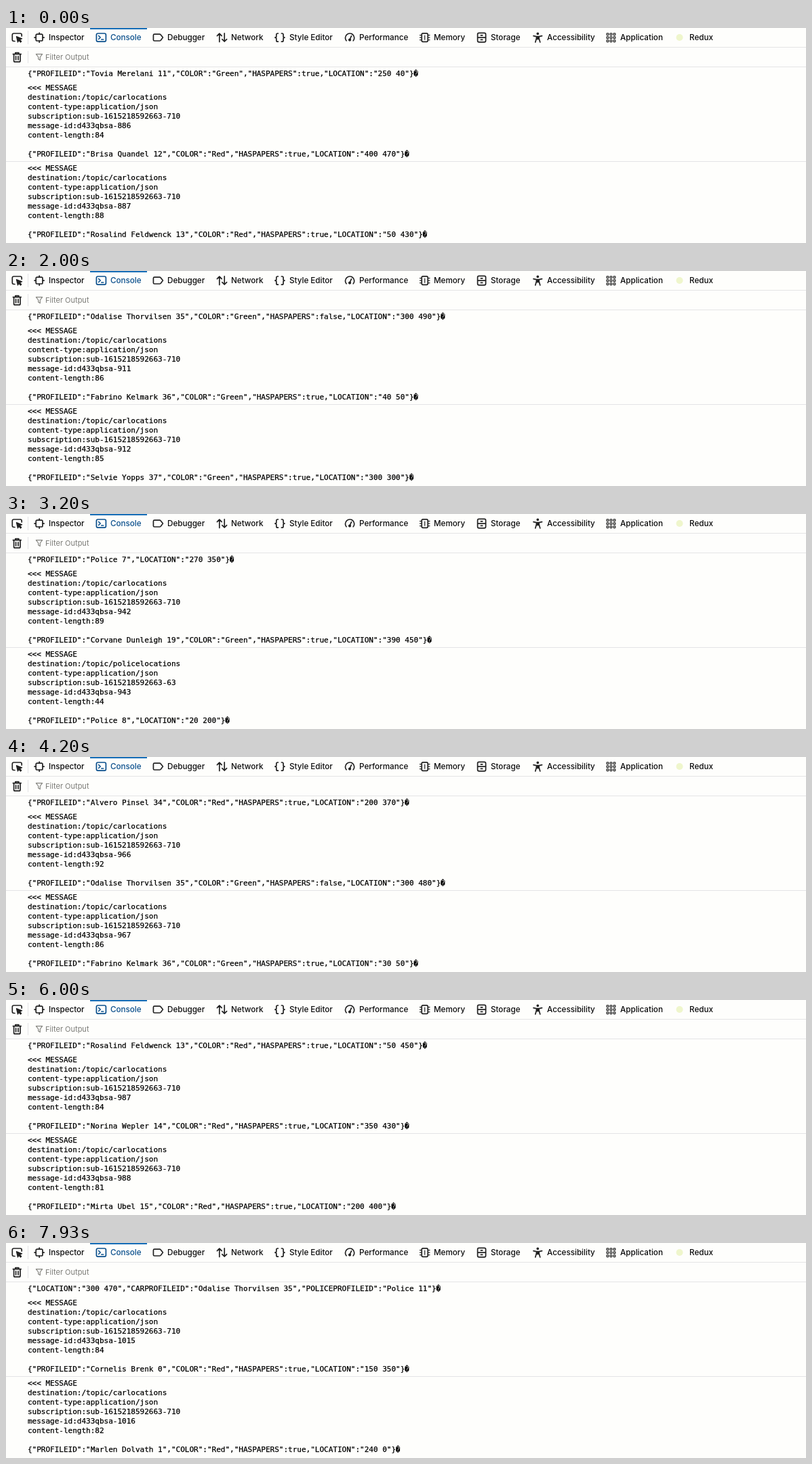
An HTML page that plays this animation: 1180 px wide and 318 px high, repeating every 8 s.

```html
<!DOCTYPE html>
<html lang="en">
<head>
<meta charset="utf-8">
<title>Console log</title>
<style>
  html, body { margin: 0; width: 100%; height: 100%; overflow: hidden; background: #fefefc; }
  svg { display: block; }
  .tab { font: 500 11.65px Inter, "Open Sans", sans-serif; fill: #0c0c0d; }
  .tab.on { fill: #0a4f8c; }
  .hint { font: 11px Inter, "Open Sans", sans-serif; fill: #7c7c78; }
  .log { font: 11px "DejaVu Sans Mono", "Liberation Mono", monospace; fill: #000; stroke: #000; stroke-width: 0.25; white-space: pre; }
  .icon { fill: none; stroke: #222; stroke-width: 1.7; stroke-linecap: round; stroke-linejoin: round; }
  .icon .solid { fill: #222; }
  .icon .thin { stroke-width: 1.2; }
  .rule { stroke: #e4e4e6; stroke-width: 1; }
</style>
</head>
<body>
<svg id="stage" width="1180" height="318" viewBox="0 0 1180 318">
  <rect width="1180" height="318" fill="#fefefc"/>
  <path class="rule" d="M0 28.5H1180M0 57.5H1180M0 197.5H1180M32.5 4V24M32.5 34V52"/>
  <rect x="124" width="84" height="2" fill="#1a70b8"/>

  <g class="icon">
    <!-- element picker -->
    <path d="M13 19.5H11.5Q9.3 19.5 9.3 17.3V10.2Q9.3 8 11.5 8H21Q23.2 8 23.2 10.2V12"/>
    <path class="solid thin" d="M15.4 12.6L23.6 15.8L20.4 17.2L22.8 19.8L21.4 21L19 18.4L17.4 21Z"/>
    <!-- inspector -->
    <rect x="44.2" y="9.2" width="9.8" height="9.8" rx="1.8"/>
    <path d="M49.1 7V9M49.1 19V21.2M42 14.1H44M54.2 14.1H56.2"/>
    <!-- console -->
    <g stroke="#0a4f8c">
      <rect x="133.4" y="8" width="14" height="12.2" rx="2.2"/>
      <path d="M136.6 11.5L139.2 14L136.6 16.5M140.8 17H143.6"/>
    </g>
    <!-- debugger -->
    <path d="M219 9.2H226.4Q227.5 9.2 228.2 10L231.4 14.1L228.2 18.2Q227.5 19 226.4 19H219Q217.4 19 217.4 17.4V10.8Q217.4 9.2 219 9.2Z"/>
    <!-- network -->
    <path d="M314.8 20.4V8.2M311.4 11.6L314.8 8.2L318.2 11.6M322.2 7.8V20M318.8 16.6L322.2 20L325.6 16.6"/>
    <!-- style editor -->
    <path d="M401.4 8H400.6Q398.8 8 398.8 9.8V12.2Q398.8 14.1 396.8 14.1Q398.8 14.1 398.8 16V18.4Q398.8 20.2 400.6 20.2H401.4M406.4 8H407.2Q409 8 409 9.8V12.2Q409 14.1 411 14.1Q409 14.1 409 16V18.4Q409 20.2 407.2 20.2H406.4"/>
    <!-- performance -->
    <path d="M502 18.8A6.6 6.6 0 1 1 512.2 18.8M507.1 17.2L509.4 11.8"/>
    <circle class="solid thin" cx="507" cy="17.6" r="1.5"/>
    <!-- memory -->
    <rect x="613.2" y="7.8" width="9" height="12.6" rx="1.8"/>
    <path class="thin" d="M610.4 10.6H612.4M610.4 14.1H612.4M610.4 17.6H612.4M623 10.6H625M623 14.1H625M623 17.6H625M617.7 11V17.2"/>
    <!-- storage -->
    <rect x="695.6" y="7.4" width="12" height="13.4" rx="2"/>
    <path d="M696 14.1H707.4M700.4 10.8H702.8M700.4 17.4H702.8"/>
    <!-- accessibility -->
    <circle class="solid thin" cx="784.3" cy="8.3" r="1.3"/>
    <path d="M778 11.6L782.4 12.6V15.6L780.8 21M790.6 11.6L786.2 12.6V15.6L787.8 21M782.4 12.6H786.2"/>
    <path class="solid thin" d="M782.6 12.6H786V16.6H782.6Z"/>
    <g id="grid"></g>
    <!-- trash -->
    <path d="M10.4 38.6H22.2M13.8 38V36.6H18.8V38M11.6 39V48.4Q11.6 50.2 13.4 50.2H19.2Q21 50.2 21 48.4V39M14.6 41.8V47M18 41.8V47"/>
    <!-- filter -->
    <path stroke="#85857f" stroke-width="1.2" d="M44.4 38.6H53.6L50.3 43V47.6L47.7 46V43Z"/>
  </g>
  <circle cx="993.5" cy="14" r="5" fill="#eff6cc"/>
  <text class="hint" x="58" y="47">Filter Output</text>
</svg>
<script>
const NS = "http://www.w3.org/2000/svg";
const stage = document.getElementById("stage");

function add(parent, tag, attrs, text = "") {
  const el = document.createElementNS(NS, tag);
  for (const key in attrs) el.setAttribute(key, attrs[key]);
  el.textContent = text;
  parent.appendChild(el);
  return el;
}

// Toolbar
const tabs = {
  Inspector: 63, Console: 154, Debugger: 238, Network: 332, "Style Editor": 418,
  Performance: 521, Memory: 631, Storage: 715, Accessibility: 798, Application: 906, Redux: 1008
};
for (const name in tabs) {
  add(stage, "text", { class: name === "Console" ? "tab on" : "tab", x: tabs[name], y: 18 }, name);
}
for (let i = 0; i < 9; i++) {
  add(document.getElementById("grid"), "rect", {
    x: 886 + (i % 3) * 5, y: 7.8 + Math.floor(i / 3) * 5, width: 2.8, height: 2.8, rx: 0.5, "stroke-width": 1.2
  });
}

// Drivers: name, colour, papers, x, y; missing fields follow from the index
const cars = `Cornelis Brenk,Red,true,180,350
Marlen Dolvath,Red,true,240,-30
Junia Pelverton
Tarvin Oskell
Elvira Monteska
Dorian Hask
Wenona Glaspie
Ramiro Untvedt
Petra Lindoval
Garth Wimsock
Ilsa Corvander
Tovia Merelani,Green,true,250,40
Brisa Quandel,Red,true,400,470
Rosalind Feldwenck,Red,true,50,430
Norina Wepler,Red,true,330,430
Mirta Ubel,Red,true,200,420
Hollis Graventa
Keziah Blomder
Anselm Tirrow
Corvane Dunleigh,Green,true,390,460
Lovina Straub
Osric Penhall
Delphie Marruco
Waldo Esterlin
Sabra Kintvall
Emeric Foldan
Thessa Yorvick
Bastian Crewl
Ione Haddervik
Quillan Rospe
Verenia Tormio,Red,false,300,0
Calder Wrobenko,Green,false,100,60
Stefon Haakvel,Red,true,220,350
Mabry Ostenfeld
Alvero Pinsel,Red,true,190,370
Odalise Thorvilsen,Green,false,300,490
Fabrino Kelmark,Green,true,40,50
Selvie Yopps,Green,true,300,300
Nadia Crombell
Jorund Vasker`.split("\n").map((row, i) => {
  const [name, color, papers, x, y] = row.split(",");
  return {
    id: `${name} ${i}`,
    color: color || (i % 3 ? "Red" : "Green"),
    papers: papers || String(i % 5 !== 2),
    x: +(x ?? 30 + (i * 70) % 440),
    y: +(y ?? 50 + (i * 130) % 400)
  };
});

// Each round a car moves ten units along one axis
const headings = [[-10, 0], [0, 10], [10, 0], [0, -10]];
function place(i, round) {
  const [dx, dy] = headings[i % 4];
  return `${Math.max(0, cars[i].x + dx * round)} ${Math.max(0, cars[i].y + dy * round)}`;
}

const carBody = (i, round) => {
  const c = cars[i];
  return `{"PROFILEID":"${c.id}","COLOR":"${c.color}","HASPAPERS":${c.papers},"LOCATION":"${place(i, round)}"}`;
};
const policeSpots = { 7: "270 350", 8: "20 200" };
const policeBody = n =>
  `{"PROFILEID":"Police ${n}","LOCATION":"${policeSpots[n] || `${(n * 90 + 40) % 500} ${(n * 150 + 70) % 500}`}"}`;
const stopBody = (i, n, round) =>
  `{"LOCATION":"${place(i, round)}","CARPROFILEID":"${cars[i].id}","POLICEPROFILEID":"Police ${n}"}`;

// Message id -> [car, officer]
const stops = { 895: [17, 4], 975: [31, 3], 980: [2, 9], 1000: [22, 6], 1014: [35, 11] };
const messages = {};
for (let id = 885, car = 11, round = 0, officer = 0; id <= 1016; id++) {
  let topic = "carlocations", sub = 710, body;
  if (stops[id]) {
    const [i, n] = stops[id];
    topic = "stoppedcars";
    sub = 64;
    body = stopBody(i, n, i < car ? round : round - 1); // where the car was last reported
  } else if (id >= 927 && id <= 957 && id % 2) {
    topic = "policelocations";
    sub = 63;
    body = policeBody(officer++);
  } else {
    body = carBody(car, round);
    car = (car + 1) % cars.length;
    if (car === 0) round++;
  }
  messages[id] = [
    "<<< MESSAGE",
    `destination:/topic/${topic}`,
    "content-type:application/json",
    `subscription:sub-1615218592663-${sub}`,
    `message-id:d433qbsa-${id}`,
    `content-length:${body.length}`,
    "",
    body + "\ufffd"
  ];
}

// Log lines: tail of one message, then two whole messages
const line = y => add(stage, "text", { class: "log", x: 32, y });
const block = top => Array.from({ length: 8 }, (_, i) => line(top + i * 14));
const tail = line(71);
const upper = block(92), lower = block(211);

// Steps of the log: [tick, newest id]
const TICK = 200 / 3, LOOP = 8000;
const pace = [[0, 887], [13, 907], [30, 912], [48, 943], [63, 967], [90, 988], [119, 1016]];
function newest(tick) {
  const n = Math.max(1, pace.findIndex(p => p[0] >= tick));
  const [t0, a] = pace[n - 1], [t1, b] = pace[n];
  return Math.floor(a + (b - a) * (tick - t0) / (t1 - t0) + 1e-6);
}

let shown = 0;
function draw(now) {
  const tick = Math.min(119, Math.floor((now % LOOP + 5) / TICK));
  const id = newest(tick);
  if (id !== shown) {
    shown = id;
    tail.textContent = messages[id - 2][7];
    upper.forEach((el, i) => el.textContent = messages[id - 1][i]);
    lower.forEach((el, i) => el.textContent = messages[id][i]);
  }
}

const start = performance.now();
function loop() {
  draw(performance.now() - start);
  requestAnimationFrame(loop);
}
loop();
</script>
</body>
</html>
```
